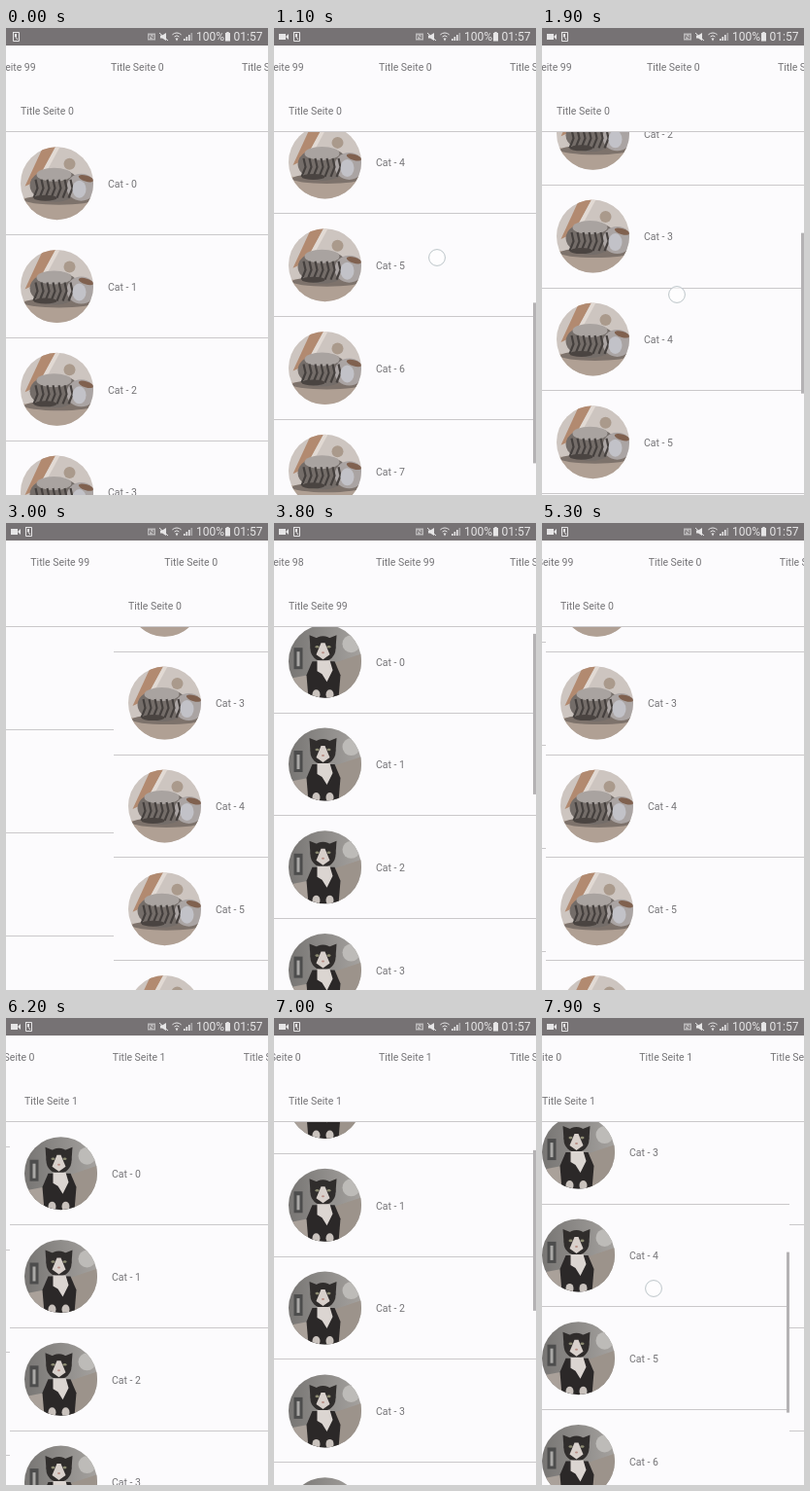
Write an HTML page with a canvas that moves like this. It is 270 by 480 pixels and loops after 8 s.

```html
<!DOCTYPE html>
<html lang="en">
<head>
<meta charset="utf-8">
<style>
html, body { margin: 0; width: 100%; height: 100%; overflow: hidden; background: #fcfbfd; }
canvas { display: block; width: 270px; height: 480px; }
</style>
</head>
<body>
<canvas></canvas>
<script>
const W = 270, H = 480, LOOP = 8000, STEP = 100;
const TOP = 106.5, ROW = 105.8, ROWS = 10, VIEW = 417;
const canvas = document.querySelector('canvas');
const c = canvas.getContext('2d');
const dpr = window.devicePixelRatio || 1;
canvas.width = W * dpr;
canvas.height = H * dpr;

const swipes = [{ start: 2780, dir: -1 }, { start: 4760, dir: 1 }, { start: 5780, dir: 1 }];

// Scroll moves per page
const flicks = {
  '0': [{ start: 400, dur: 800, by: 465 }, { start: 1300, dur: 450, by: -231 }, { start: 1750, dur: 300, by: 58 }],
  '-1': [{ start: 3700, dur: 800, by: 407 }],
  '1': [{ start: 6700, dur: 1000, by: 339 }]
};

// Where the finger lifts, and the way it came
const touches = [
  { end: 1100, x: 168, y: 236, dx: 18, dy: -120 },
  { end: 1900, x: 139, y: 274, dx: -4, dy: -30 },
  { end: 4300, x: 152, y: 240, dx: 12, dy: -120 },
  { end: 7900, x: 115, y: 278, dx: -15, dy: 0 },
  ...swipes.map(s => ({ end: s.start + 140, x: 135 - s.dir * 30, y: 278, dx: -s.dir * 60, dy: 0 }))
];

const span = (t, start, dur) => Math.min(1, Math.max(0, (t - start) / dur));
const smooth = k => k * k * (3 - 2 * k);
const cubic = k => k < .5 ? 4 * k ** 3 : 1 - 4 * (1 - k) ** 3;

// A swipe rests just short of the page, then snaps home.
function swiped(t, { start, dir }) {
  return dir * (t > start + 810 ? 1 : Math.min(.987, cubic(span(t, start, 470))));
}

const pager = t => swipes.reduce((sum, s) => sum + swiped(t, s), 0) + .056 * span(t, 7600, 300) ** 2;
const scrolled = (moves, t) => moves.reduce((sum, m) => sum + m.by * smooth(span(t, m.start, m.dur)), 0);

function barAlpha(moves, t) {
  const last = moves[moves.length - 1];
  return t > moves[0].start ? 1 - span(t, last.start + last.dur + 250, 100) : 0;
}

function rect(x, y, w, h, color) {
  c.fillStyle = color;
  c.fillRect(x, y, w, h);
}

function oval(x, y, rx, ry, color, turn = 0) {
  c.fillStyle = color;
  c.beginPath();
  c.ellipse(x, y, rx, ry, turn, 0, Math.PI * 2);
  c.fill();
}

function trace(p) {
  c.beginPath();
  for (let i = 0; i < p.length; i += 2) c.lineTo(p[i], p[i + 1]);
}

function poly(color, ...p) {
  c.fillStyle = color;
  trace(p);
  c.fill();
}

function line(color, width, ...p) {
  c.strokeStyle = color;
  c.lineWidth = width;
  trace(p);
  c.stroke();
}

function label(text, x, y, align = 'left', color = '#747376', size = 10.5) {
  c.font = size + 'px Roboto, sans-serif';
  c.textAlign = align;
  c.fillStyle = color;
  c.fillText(text, x, y);
}

function tabby() {
  rect(-38, -38, 76, 76, '#cdc5c0');
  poly('#b28a70', -14, -38, -1, -38, -20, -3, -33, 3);
  line('#e2dad4', 4, 1, -38, -17, -5);
  oval(13, -20, 6, 6, '#aa9a8c');
  rect(-38, 15, 76, 24, '#b0a094');
  oval(2, 17, 36, 5, '#7d726b');
  oval(-2, 2, 26, 17, '#746d69');
  oval(-3, -9, 18, 7, '#a9a3a0');
  oval(25, 4, 15, 14, '#aaa4a3');
  for (let i = 0; i < 7; i++) line('#45403e', 2.2, -24 + i * 6, 15, -20 + i * 6, 5, -22 + i * 6, -4);
  oval(23, 6, 7, 9, '#c2c2c8');
  oval(30, -5, 8, 3, '#80614f', .3);
  oval(-12, 15, 12, 3, '#4a4441');
}

function tuxedo() {
  const g = c.createLinearGradient(-38, 0, 38, 0);
  g.addColorStop(0, '#777573');
  g.addColorStop(1, '#a5a29f');
  rect(-38, -38, 76, 76, g);
  rect(-32, -14, 9, 22, '#4d4d4d');
  rect(-29, -10, 3, 15, '#a9a8a6');
  oval(27, -18, 9, 9, '#bdbbb8');
  poly('#9c938b', 8, 2, 38, -8, 38, 38, 8, 38);
  poly('#aaa19a', -38, 18, -12, 13, -12, 38, -38, 38);
  poly('#2b2828', -17, 38, -19, 14, -13, 0, 10, 0, 16, 14, 14, 38);
  oval(-2, -13, 13, 13, '#302d2c');
  for (const s of [-1, 1]) {
    poly('#302d2c', -2 + s * 13, -13, -2 + s * 14, -27, -2 + s * 4, -23);
    oval(-2 + s * 6, -15, 2, 1.3, '#8c8b72');
    oval(-2 + s * 7, 34, 4, 5, '#c9c2bd');
  }
  poly('#d8d0cb', -4, -19, 0, -19, 5, -7, -2, -2, -9, -7);
  oval(-2, -9, 1.5, 1, '#b98f86');
  poly('#dbd5d1', -8, -1, 5, -1, 8, 9, 2, 21, -3, 13, -8, 10);
}

function photo(x, y, draw) {
  c.save();
  c.translate(x, y);
  c.beginPath();
  c.arc(0, 0, 37.5, 0, Math.PI * 2);
  c.clip();
  draw();
  c.restore();
}

const title = i => 'Title Seite ' + (i + 100) % 100;

function page(i, x, t) {
  const moves = flicks[i] || [];
  const scroll = scrolled(moves, t);
  c.save();
  label(title(i), x + 15, 88.5);
  rect(x, 106, W, 1, '#cac8ca');
  c.beginPath();
  c.rect(x, 107, W, H - 107);
  c.clip();
  for (let n = 0; n < ROWS; n++) {
    const y = TOP + n * ROW - scroll;
    if (y > H || y < TOP - ROW) continue;
    photo(x + 52.5, y + 53.2, i % 2 ? tuxedo : tabby);
    label('Cat - ' + n, x + 105, y + 57.5);
    rect(x, Math.round(y + ROW - .2), W, 1, '#cac8ca');
  }
  if (moves.length) {
    c.globalAlpha = barAlpha(moves, t);
    rect(x + W - 3, 107 + scroll * VIEW / (ROWS * ROW), 3, 165, '#b4b2b4');
  }
  c.restore();
}

function phoneIcon(x, ink) {
  line(ink, 1, x + .5, 4, x + .5, 13.5, x + 6.5, 13.5, x + 6.5, 4.5, x, 4.5);
  rect(x + 2, 6, 2, 3, ink);
  line(ink, 1, x + 2, 8, x + 5, 12);
}

function statusBar(t) {
  const ink = '#e6e5e6';
  rect(0, 0, W, 18, '#767274');
  if (t >= STEP) {
    rect(5, 6, 7, 6, ink);
    poly(ink, 12, 9, 15, 6, 15, 12);
  }
  phoneIcon(t < STEP ? 7 : 20, ink);
  rect(146, 5.5, 8, 7, '#bab8b9');
  line('#767274', 1, 147.5, 11, 148, 7.5, 152, 11, 152, 7);
  poly(ink, 159, 7.5, 161, 7.5, 165, 5, 165, 13, 161, 10.5, 159, 10.5);
  line(ink, 1, 158, 5, 167, 13);
  for (const r of [3.5, 6.5]) {
    c.beginPath();
    c.arc(176, 11.5, r, -Math.PI * .75, -Math.PI * .25);
    c.stroke();
  }
  poly(ink, 174.5, 10.5, 177.5, 10.5, 176, 13.5);
  for (let i = 0; i < 4; i++) rect(183 + i * 2.5, 11 - i * 2, 1.6, 2 + i * 2, i < 3 ? ink : '#aaa8a9');
  rect(226, 5, 5, 8.5, ink);
  rect(227.3, 4, 2.4, 1, ink);
  label('100%', 196, 13.3, 'left', ink, 12);
  label('01:57', 264.5, 13.3, 'right', ink, 12);
}

function finger(t) {
  const touch = touches.find(p => t <= p.end && t > p.end - 200);
  if (!touch) return;
  const left = (touch.end - t) / 200;
  c.beginPath();
  c.arc(touch.x - touch.dx * left, touch.y - touch.dy * left, 8.4, 0, Math.PI * 2);
  c.fillStyle = 'rgba(255,255,255,.6)';
  c.fill();
  c.strokeStyle = '#bcc5c9';
  c.lineWidth = 1;
  c.stroke();
}

function draw(t) {
  c.setTransform(dpr, 0, 0, dpr, 0, 0);
  rect(0, 0, W, H, '#fcfbfd');
  const pos = pager(t);
  const first = Math.floor(pos);
  for (let i = first; i <= first + 1; i++) page(i, Math.round((i - pos) * W), t);
  for (let i = first - 1; i <= first + 2; i++) label(title(i), W / 2 * (1 + i - pos) + .3, 44.2, 'center');
  statusBar(t);
  finger(t);
}

const start = performance.now();
function tick() {
  const t = (performance.now() - start) % LOOP;
  draw(Math.floor(t / STEP) * STEP);
  requestAnimationFrame(tick);
}
tick();
</script>
</body>
</html>
```
